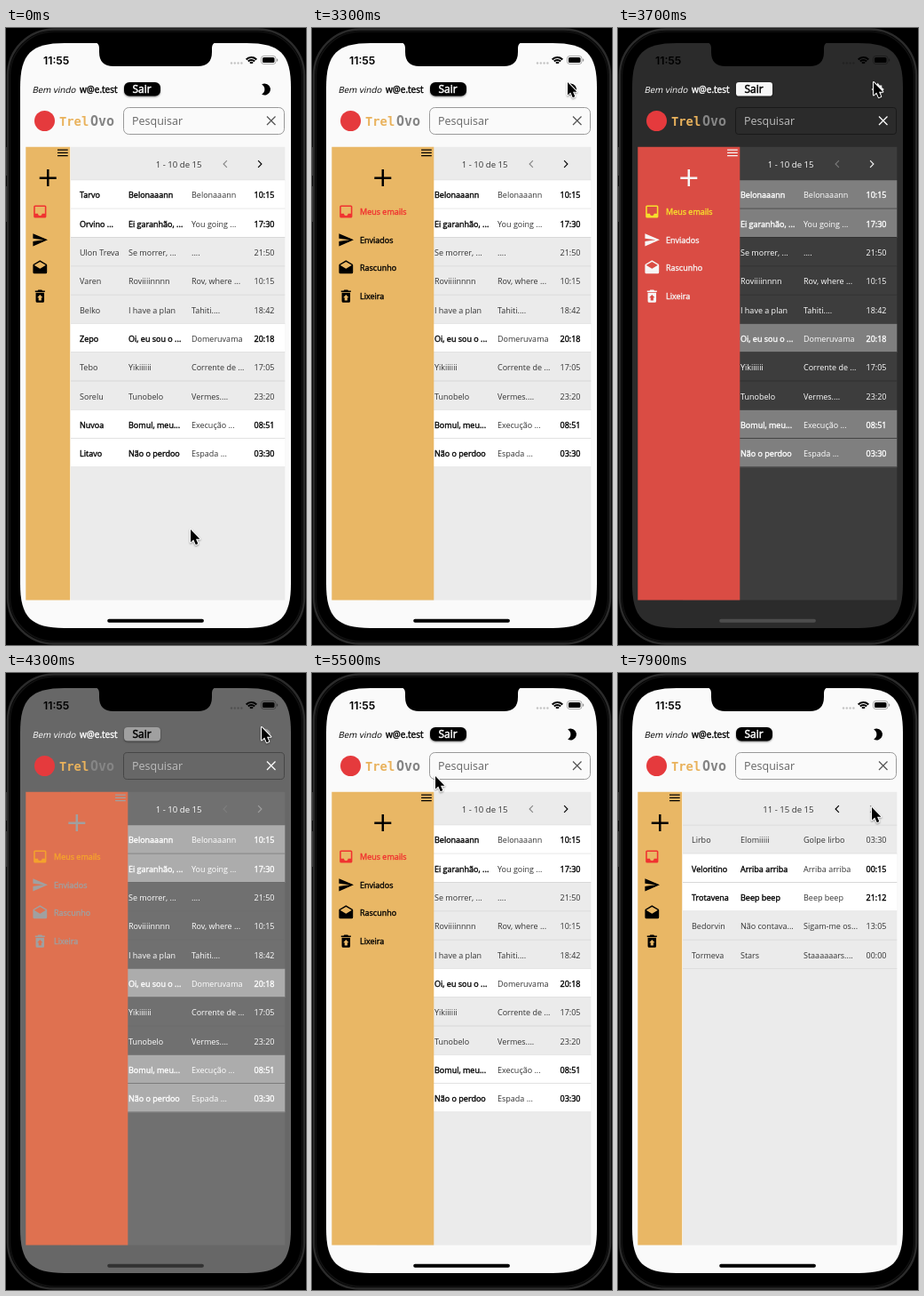
Write an HTML page with a canvas that moves like this. It is 338 px wide and 694 px high and loops after 8000 ms.

```html
<!DOCTYPE html>
<html lang="pt">
<head>
<meta charset="utf-8">
<style>
html, body { margin: 0; width: 100%; height: 100%; overflow: hidden; background: #000; }
canvas { display: block; width: 338px; height: 694px; }
</style>
</head>
<body>
<canvas id="stage"></canvas>
<script>
const LOOP = 8000, STEP = 200;
const canvas = document.getElementById('stage');
const ctx = canvas.getContext('2d');
const dpr = window.devicePixelRatio || 1;
canvas.width = 338 * dpr;
canvas.height = 694 * dpr;

// Each row: sender, subject, preview, time, unread
const pages = [
  [
    ['Tarvo', 'Belonaaann', 'Belonaaann', '10:15', 1],
    ['Orvino ...', 'Ei garanhão, ...', 'You going ...', '17:30', 1],
    ['Ulon Treva', 'Se morrer, ...', '....', '21:50', 0],
    ['Varen', 'Roviiiinnnn', 'Rov, where ...', '10:15', 0],
    ['Belko', 'I have a plan', 'Tahiti....', '18:42', 0],
    ['Zepo', 'Oi, eu sou o ...', 'Domeruvama', '20:18', 1],
    ['Tebo', 'Yikiiiiii', 'Corrente de ...', '17:05', 0],
    ['Sorelu', 'Tunobelo', 'Vermes....', '23:20', 0],
    ['Nuvoa', 'Bomul, meu...', 'Execução ...', '08:51', 1],
    ['Litavo', 'Não o perdoo', 'Espada ...', '03:30', 1]
  ],
  [
    ['Lirbo', 'Elomiiiii', 'Golpe lirbo', '03:30', 0],
    ['Veloritino', 'Arriba arriba', 'Arriba arriba', '00:15', 1],
    ['Trotavena', 'Beep beep', 'Beep beep', '21:12', 1],
    ['Bedorvin', 'Não contava...', 'Sigam-me os...', '13:05', 0],
    ['Tormeva', 'Stars', 'Staaaaaars....', '00:00', 0]
  ]
];

// Icons on a 24 unit grid
const icons = {
  inbox: new Path2D('M19 3H5a2 2 0 0 0-2 2v14a2 2 0 0 0 2 2h14a2 2 0 0 0 2-2V5a2 2 0 0 0-2-2zm0 12h-4a3 3 0 0 1-6 0H5V5h14z'),
  send: new Path2D('M2 21 23 12 2 3v7l15 2-15 2z'),
  draft: new Path2D('M22 8q0-1-1-1.7L12 1 3 6.3Q2 7 2 8v10a2 2 0 0 0 2 2h16a2 2 0 0 0 2-2zM12 13 3.7 7.8 12 3l8.3 4.8z'),
  trash: new Path2D('M19 4h-3.5l-1-1h-5l-1 1H5v2h14zM6 7v12a2 2 0 0 0 2 2h8a2 2 0 0 0 2-2V7zm8 7v4h-4v-4H8l4-4 4 4z'),
  moon: new Path2D('M10 2a10 10 0 0 0-5 1.35 10 10 0 0 1 0 17.3A10 10 0 1 0 10 2z'),
  sun: new Path2D('M5 5h4l3-4 3 4h4v4l4 3-4 3v4h-4l-3 4-3-4H5v-4l-4-3 4-3z')
};
const MENU_SCALE = 0.79, SMALL_SCALE = 0.65;
const pointer = new Path2D('M0 0V14.6L3.3 11.5 5.8 17.2 8.3 16.1 6 10.7H10.4z');
const notch = new Path2D('M100 16Q105 17 105 23V27Q105 43 121 43H216Q232 43 232 27V23Q232 17 237 16z');
const menu = [
  ['inbox', 'Meus emails', 206.5],
  ['send', 'Enviados', 238.3],
  ['draft', 'Rascunho', 270],
  ['trash', 'Lixeira', 301.7]
];

// Pointer stops: time, x, y
const stops = [
  [300, 208, 564], [700, 165, 430], [1100, 75, 215], [1300, 47, 150], [1500, 62, 136],
  [2100, 62, 136], [2700, 268, 81], [2900, 287, 62], [3100, 288, 61], [4500, 288, 61],
  [5100, 184, 83], [5500, 139, 116], [5700, 124, 135], [6500, 124, 136],
  [7300, 291, 108], [7500, 286, 151]
];

const clamp = v => Math.max(0, Math.min(1, v));
const lerp = (a, b, k) => a + (b - a) * k;
const ease = k => 1 - Math.pow(1 - k, 2.2) * (1 + k * 0.9);
const ramp = (t, start, length = 300) => ease(clamp((t - start) / length));

function mix(light, dark, k) {
  const part = (hex, i) => parseInt(hex.slice(i, i + 2), 16);
  return `rgb(${[1, 3, 5].map(i => Math.round(lerp(part(light, i), part(dark, i), k)))})`;
}

function pointerAt(t) {
  const next = stops.findIndex(s => s[0] > t);
  if (next === 0) return stops[0].slice(1);
  if (next < 0) return stops[stops.length - 1].slice(1);
  const a = stops[next - 1], b = stops[next], k = (t - a[0]) / (b[0] - a[0]);
  return [lerp(a[1], b[1], k), lerp(a[2], b[2], k)];
}

function rect(x, y, w, h, color, radius = 0) {
  ctx.fillStyle = color;
  ctx.beginPath();
  ctx.roundRect(x, y, w, h, radius);
  ctx.fill();
}

function outline(x, y, w, h, color, radius, width = 1) {
  ctx.strokeStyle = color;
  ctx.lineWidth = width;
  ctx.beginPath();
  ctx.roundRect(x, y, w, h, radius);
  ctx.stroke();
}

// Rectangle whose corners ease into the sides
function smoothRect(x, y, w, h, radius) {
  const far = radius * 1.35, near = radius * 0.33, right = x + w, bottom = y + h;
  ctx.beginPath();
  ctx.moveTo(x, y + far);
  ctx.bezierCurveTo(x, y + near, x + near, y, x + far, y);
  ctx.lineTo(right - far, y);
  ctx.bezierCurveTo(right - near, y, right, y + near, right, y + far);
  ctx.lineTo(right, bottom - far);
  ctx.bezierCurveTo(right, bottom - near, right - near, bottom, right - far, bottom);
  ctx.lineTo(x + far, bottom);
  ctx.bezierCurveTo(x + near, bottom, x, bottom - near, x, bottom - far);
  ctx.closePath();
}

function line(points, color, width) {
  ctx.strokeStyle = color;
  ctx.lineWidth = width;
  ctx.beginPath();
  points.forEach(([x, y]) => ctx.lineTo(x, y));
  ctx.stroke();
}

function disc(x, y, r, color) {
  ctx.fillStyle = color;
  ctx.beginPath();
  ctx.arc(x, y, r, 0, 7);
  ctx.fill();
}

// Heavy text is the regular face thickened by a thin stroke
function text(str, x, y, size, color, { heavy = false, align = 'left', font = '"Open Sans", sans-serif', weight = 400 } = {}) {
  ctx.font = `${weight} ${size}px ${font}`;
  ctx.textAlign = align;
  ctx.fillStyle = ctx.strokeStyle = color;
  ctx.fillText(str, x, y);
  if (heavy) {
    ctx.lineWidth = size * 0.04;
    ctx.strokeText(str, x, y);
  }
}

function icon(name, x, y, scale, color) {
  ctx.save();
  ctx.translate(x, y);
  ctx.scale(scale, scale);
  ctx.translate(-12, -12);
  ctx.fillStyle = color;
  ctx.fill(icons[name], 'evenodd');
  ctx.restore();
}

function drawStatus() {
  ctx.fillStyle = '#000';
  ctx.fill(notch);
  text('11:55', 56.7, 41, 12.3, '#000', { align: 'center', weight: 600, font: 'Inter, sans-serif' });
  for (let i = 0; i < 4; i++) disc(254 + i * 3.8, 39.5, 1.2, 'rgba(0,0,0,.22)');
  for (const r of [2, 5, 8]) {
    ctx.strokeStyle = '#000';
    ctx.lineWidth = 2.1;
    ctx.beginPath();
    ctx.arc(276.5, 41, r, -Math.PI * 0.76, -Math.PI * 0.24);
    ctx.stroke();
  }
  outline(287.5, 31.5, 16.5, 9, 'rgba(0,0,0,.4)', 2.8, 0.8);
  rect(289, 33, 13.5, 6, '#000', 1.6);
  rect(305, 34.5, 1.2, 3, 'rgba(0,0,0,.4)', 1);
}

function drawHeader(p, q, dark) {
  const ink = mix('#000000', '#ffffff', q);
  ctx.save();
  ctx.transform(1, 0, -0.22, 1, 29.5, 72.5);
  text('Bem vindo', 0, 0, 9.8, ink);
  ctx.restore();
  text('w@e.test', 83, 72.5, 10, ink, { heavy: true });

  ctx.save();
  ctx.shadowColor = 'rgba(0,0,0,.5)';
  ctx.shadowBlur = 2;
  ctx.shadowOffsetY = 1;
  rect(133, 61, 41, 15.5, mix('#000000', '#ffffff', p), lerp(6, 3, p));
  ctx.restore();
  text('Sair', 153, 73, 12, mix('#ffffff', '#000000', q), { heavy: true, align: 'center' });
  icon(dark ? 'sun' : 'moon', 292.7, 69, SMALL_SCALE, mix('#000000', '#ffffff', p));

  disc(43.5, 104.5, 11.5, '#e53a3d');
  const logo = { font: '"DejaVu Sans Mono", monospace', weight: 700 };
  text('Trel', 60, 109.5, 13.8, '#e9b25c', logo);
  text('Ovo', 95, 109.5, 15, '#858585', logo);

  outline(132.5, 89.5, 181, 30, mix('#999999', '#151515', p), lerp(6, 3, p));
  text('Pesquisar', 142, 108.5, 12.5, mix('#666666', '#bdbdbd', q));
  const cross = mix('#555555', '#ffffff', q);
  line([[294, 99.5], [303.5, 109]], cross, 1.3);
  line([[303.5, 99.5], [294, 109]], cross, 1.3);
}

function chevron(x, dir, color) {
  line([[x - dir * 1.9, 149.2], [x + dir * 1.9, 153], [x - dir * 1.9, 156.8]], color, 1.15);
}

function drawList(p, q, base, page) {
  rect(73, 133.8, 241.3, 509.6, mix('#ebebeb', '#383838', base));
  text(page ? '11 - 15 de 15' : '1 - 10 de 15', 220.5, 156.5, 9.6, mix('#333333', '#ffffff', q), { align: 'right' });
  const active = mix('#000000', '#ffffff', p), idle = mix('#888888', '#777777', p);
  chevron(247, -1, page ? active : idle);
  chevron(286, 1, page ? idle : active);

  const pitch = 32.3, border = mix('#d8d8d8', '#2b2b2b', p);
  rect(73, 170.7, 241.3, 0.8, border);
  pages[page].forEach(([sender, subject, preview, time, unread], i) => {
    const top = 171.3 + i * pitch, baseline = top + 20.1;
    if (unread) rect(73, top, 241.3, pitch, mix('#ffffff', '#7b7b7b', p));
    rect(73, top + pitch - 0.8, 241.3, 0.8, border);
    const main = mix(unread ? '#000000' : '#333333', '#ffffff', q), style = { heavy: !!unread };
    text(sender, 83, baseline, 9, main, style);
    text(subject, 138, baseline, 9, main, style);
    text(preview, 209, baseline, 9, mix('#333333', '#ffffff', q));
    text(time, 302.5, baseline, 9, main, { ...style, align: 'right' });
  });
}

function drawSidebar(p, open) {
  const left = 22.3, width = lerp(49.9, 115, open), right = left + width, mid = left + width / 2;
  const ink = mix('#000000', '#ffffff', p);
  ctx.save();
  ctx.beginPath();
  ctx.rect(left, 133.8, width, 509.6);
  ctx.clip();
  rect(left - 1, 133, width + 2, 512, mix('#e9b765', '#d94843', p));
  for (let i = 0; i < 3; i++) rect(right - 14.2, 136.4 + i * 3.25, 11.7, 1.3, ink);
  rect(mid - 9.5, 167.4, 19, 2.5, ink);
  rect(mid - 1.25, 159.1, 2.5, 19, ink);
  menu.forEach(([name, label, y], i) => {
    const color = i ? ink : mix('#f03230', '#f7e52c', p);
    icon(name, 38.3, y, MENU_SCALE, color);
    if (open > 0.05) text(label, 54, y + 3.2, 9, color, { heavy: true });
  });
  ctx.restore();
}

function drawPointer(t) {
  ctx.save();
  ctx.translate(...pointerAt(t));
  ctx.shadowColor = 'rgba(0,0,0,.4)';
  ctx.shadowBlur = 2;
  ctx.shadowOffsetY = 1;
  ctx.lineJoin = 'round';
  ctx.lineWidth = 2;
  ctx.strokeStyle = '#fff';
  ctx.stroke(pointer);
  ctx.shadowColor = 'transparent';
  ctx.fillStyle = '#000';
  ctx.fill(pointer);
  ctx.restore();
}

function draw(t) {
  const p = ramp(t, 3450) - ramp(t, 4220);
  const base = Math.pow(clamp(p), 0.8); // large surfaces stay dark a little longer
  const q = p > 0.3 ? 1 : 0;
  const dark = t >= 3450 && t < 4220;
  const open = ramp(t, 1750) - ramp(t, 6400);
  const page = t >= 7900 ? 1 : 0;

  ctx.setTransform(dpr, 0, 0, dpr, 0, 0);
  rect(0, 0, 338, 694, '#000');
  outline(2, 1.5, 334, 691, '#2b2b2b', 52, 2.5);
  outline(4.5, 4, 329, 686, '#111', 50, 1.5);
  for (const [y, h] of [[134, 32], [178, 40]]) rect(0, y, 1, h, '#3a3a3a');

  ctx.save();
  smoothRect(16, 17, 305, 658, 37);
  ctx.clip();
  rect(16, 17, 305, 658, mix('#fafafa', '#252525', base));
  drawHeader(p, q, dark);
  drawList(p, q, base, page);
  drawSidebar(p, open);
  rect(114.2, 664.8, 108.7, 3.9, mix('#000000', '#505050', p), 2);
  drawStatus();
  ctx.restore();
  drawPointer(t);
}

// The picture advances five times a second, on the odd tenths
function frame(now) {
  const t = now % LOOP;
  draw(Math.max(0, Math.floor((t - 100) / STEP) * STEP + 100));
  requestAnimationFrame(frame);
}
requestAnimationFrame(frame);
</script>
</body>
</html>
```
